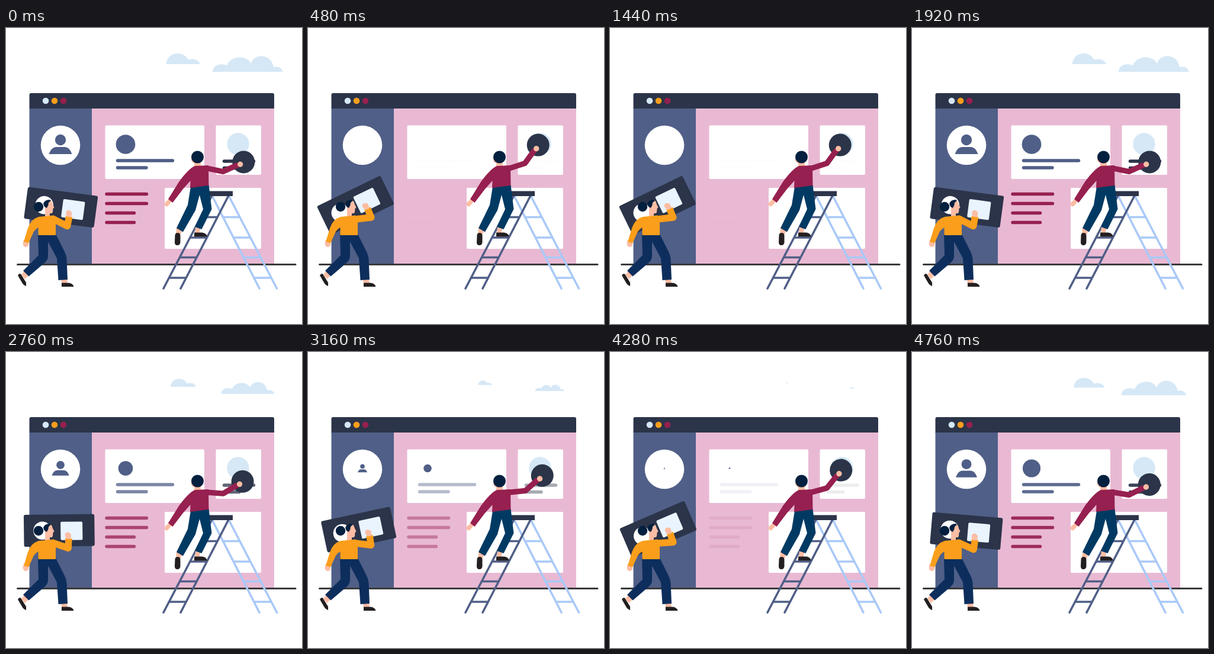
These frames come from a looping animation (500x500 px, 4.8 s). An HTML page:

```html
<!DOCTYPE html>
<html lang="en">
<head>
<meta charset="utf-8">
<title>Building a web page</title>
<style>
  html, body { margin: 0; width: 100%; height: 100%; overflow: hidden; background: #fff; }
  svg { display: block; width: 100vw; height: 100vh; }
  .dark { fill: #2b3449; } .slate { fill: #505f87; } .white { fill: #fff; }
  .sky { fill: #d6e8f6; } .amber { fill: #fb9e1b; } .wine { fill: #96204f; }
  .skin { fill: #fcbda4; } .hair { fill: #04203f; } .shoe { fill: #231f20; }
  .jeans { fill: #0d2e5c; } .trousers { fill: #003a63; }
  .line { fill: none; stroke-width: 5.4; stroke-linecap: round; stroke-linejoin: round; }
</style>
</head>
<body>
<svg viewBox="0 0 500 500">
  <!-- clouds -->
  <path class="sky" data-grow="299.3 52" d="M270.5 61C272 50 279 43 290 43C298 43 304 47 308 53.5C316 51 325 53 328 61Z"/>
  <path class="sky" data-grow="408.5 60.5" d="M348.5 74C350 62 362 59 373 63C379 47 405 44 414 60C418 43 448 42 452 66C460 64 466 67 468 74Z"/>

  <!-- browser window -->
  <path fill="#e9b9d3" d="M145 135H453V399H145Z"/>
  <path class="slate" d="M39.5 135H145V399H39.5Z"/>
  <path class="dark" d="M39.5 136V113q0-3 3-3H450q3 0 3 3V136Z"/>
  <circle class="sky" cx="67" cy="123" r="5.3"/>
  <circle class="amber" cx="82" cy="123" r="5.3"/>
  <circle class="wine" cx="97" cy="123" r="5.3"/>

  <circle class="white" cx="92" cy="198" r="33.3"/>
  <g class="slate" data-grow="92 196.3">
    <circle cx="92" cy="189" r="9.2"/>
    <path d="M72.5 213C75 206 79 201 85 201H99C105 201 109 206 111.5 213Z"/>
  </g>

  <rect class="white" x="167.5" y="164.5" width="167.5" height="90.5" rx="2"/>
  <rect class="white" x="354.5" y="164.5" width="76.5" height="83.5" rx="2"/>
  <rect class="white" x="268" y="270" width="163" height="103" rx="2"/>
  <circle class="slate" data-grow="202 196.5" cx="202" cy="196.5" r="16.4"/>
  <circle class="sky" cx="392" cy="196" r="18.7"/>
  <g id="lines" class="line">
    <path stroke="#505f87" d="M188.5 224H281.5M188.5 236H237"/>
    <path stroke="#2b3449" d="M368.5 225H418.5M368.5 236.5H394"/>
    <path stroke="#96204f" d="M170 280.5H237.5M170 296.5H237.5M170 312.5H216.5M170 328.5H216.5"/>
  </g>
  <path class="line" stroke="#3a3a3c" style="stroke-width:3" d="M19.5 399.5H489"/>

  <!-- ladder -->
  <g class="line" style="stroke-width:3.6">
    <path stroke="#a9c9f7" d="M348 283L428 440M376 283L457.5 440M366 319.5H395M384 354H413M401 387.5H430M419 422H448"/>
    <path stroke="#505f87" d="M348 283L266 440M376 283L295 440M329 319.5H357M311 354H339M294 387.5H322M276 422H304"/>
  </g>
  <rect class="dark" x="343" y="275.5" width="40" height="8.5"/>

  <!-- man on the ladder -->
  <path class="skin" d="M288 337L298 342L294 350H287ZM320 334L329 337L326 348H319Z"/>
  <path class="shoe" d="M285.5 350Q286 346 290 346Q294.500 346 294.500 351V362Q294 367 289.500 367Q285 367 285 362ZM318 345.500H331Q338 346 340 352.500H318Z"/>
  <path class="trousers" d="M312 268L307 299L288 338L299 344.500L320 308L327 282L333 306L319 336L330.500 340L347.500 306L342.500 265Z"/>
  <path class="skin" d="M276 287L281 292L275 299Q271 304 268 299Q267 294 272 292Z"/>
  <path class="skin" d="M313 218V224Q315 228 318 228V235H329V222Z"/>
  <path class="wine" d="M342 232L342.500 266L311 270L311.500 258L299 272L281.500 295L274 289L292 260Q308 238 319 233Z"/>
  <circle class="hair" cx="323.500" cy="218" r="10.500"/>
  <g id="manArm">
    <circle class="dark" cx="401.300" cy="226.500" r="19"/>
    <path class="line" stroke="#96204f" style="stroke-width:9.300;stroke-linecap:butt" d="M337 236.500L366.500 242.500L392 231"/>
    <circle class="skin" cx="395.700" cy="230.300" r="4.700"/>
  </g>

  <!-- woman carrying a card -->
  <g id="card">
    <rect class="dark" x="30.500" y="274.500" width="119.300" height="54" rx="3"/>
    <circle class="white" cx="61.800" cy="301.500" r="15.300"/>
    <rect x="92.500" y="287" width="37" height="31" rx="2" fill="#e9f4fe"/>
  </g>
  <path class="skin" d="M31 410L39 417L32 424L26 417ZM93 422H103L104 433H94Z"/>
  <path class="shoe" d="M20 418Q22 414 25 415.500L34 430V436Q29 434 27 430ZM94 430.500H105Q113 431 114.500 437H94Z"/>
  <path class="jeans" d="M54 348L55 384L29 410L38.500 419.500L66 396Q71 391 71 385V361L86 389L88.500 426L104 425L102.500 390Q102 384 99 378L84 348Z"/>
  <path class="skin" d="M66 296L74 290.500Q78 292 78.500 297L81.500 303L79.500 305L79 311Q78 314 74 313V320H66ZM30 358L38 361V367Q35 372 30.500 369Q27 366 30 358Z"/>
  <path class="hair" d="M63 297Q65 290 74 290L76 292Q71 294 71.500 299L69 304L65 302Z"/>
  <circle class="hair" cx="55" cy="302" r="8.200"/>
  <path class="amber" d="M80 316.500Q84 318 84 323V350H54.500V337Q48 341 46 346L38 363.500L30 361L37 338Q42 323 55 319Z"/>
  <g id="womanArm">
    <path class="line" stroke="#fb9e1b" style="stroke-width:11.500;stroke-linecap:butt" d="M78 322L105 331.500L106 315"/>
    <path class="skin" d="M100 307Q103 303 107 305.500L110 308L109.500 316H102.500Q99 312 100 307Z"/>
  </g>
</svg>
<script>
  const HALF = 480;
  const byId = id => document.getElementById(id);
  const growing = [...document.querySelectorAll('[data-grow]')];

  function scaleAbout(el, k) {
    const [x, y] = el.dataset.grow.split(' ');
    el.setAttribute('transform', `translate(${x} ${y}) scale(${k}) translate(${-x} ${-y})`);
  }

  function turn(id, angle, pivot) {
    byId(id).setAttribute('transform', `rotate(${angle} ${pivot})`);
  }

  // Everything runs linearly there and back; k goes 1 → 0 → 1.
  function draw(time) {
    const k = Math.abs(1 - (time % (2 * HALF)) / HALF * 1) * 1;
    const phase = time % (2 * HALF) <= HALF ? 1 - (time % HALF) / HALF : k;
    const level = time % (2 * HALF) === HALF ? 0 : phase;
    growing.forEach(el => scaleAbout(el, level));
    byId('lines').setAttribute('opacity', level);
    const carry = 7.6 - 33.6 * (1 - level);
    turn('card', carry, '81 322');
    turn('womanArm', carry, '81 322');
    turn('manArm', -29.5 * (1 - level), '340 236');
  }

  const start = performance.now();
  function tick() {
    draw(performance.now() - start);
    requestAnimationFrame(tick);
  }
  draw(0);
  requestAnimationFrame(tick);
</script>
</body>
</html>
```
